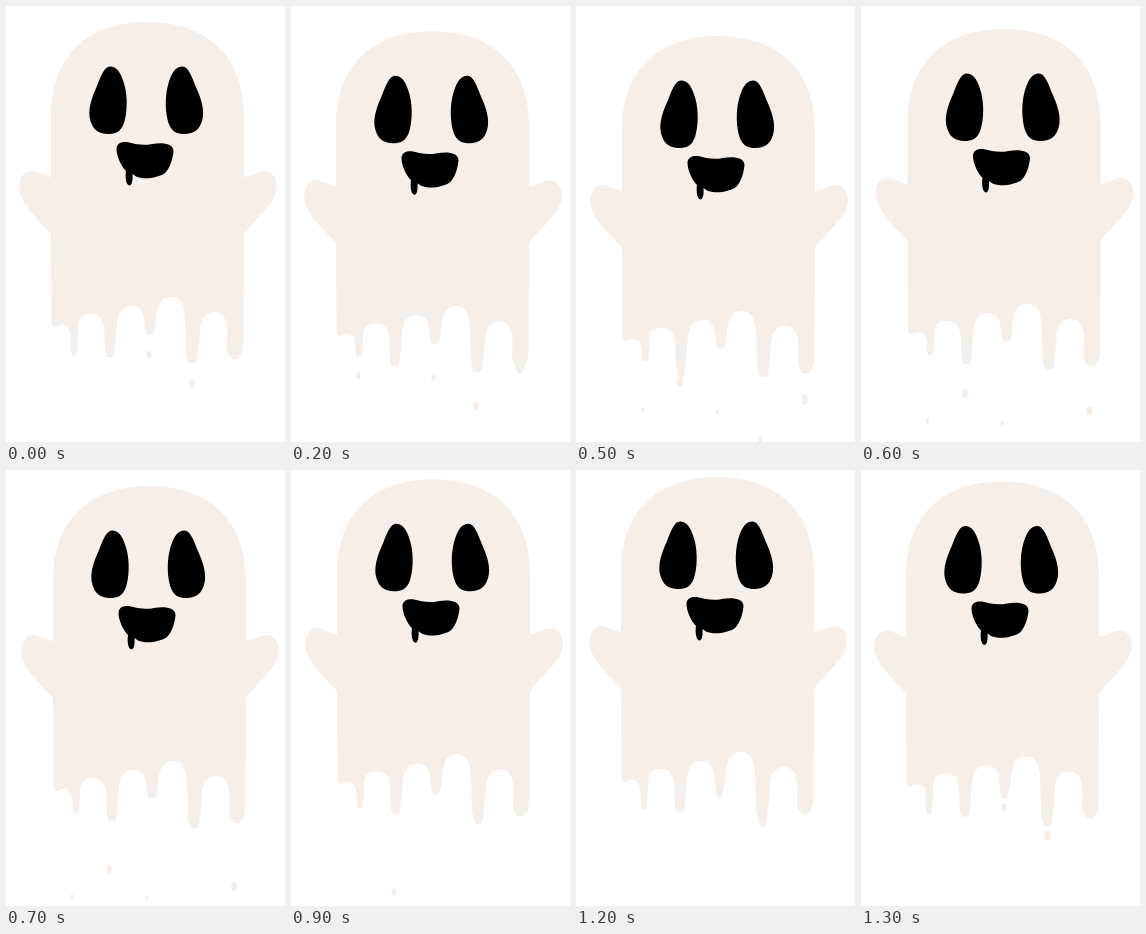
An HTML page for the animation above (1400 ms loop, 279x436 px).

```html
<!DOCTYPE html>
<html lang="en">
<head>
<meta charset="utf-8">
<title>Melting ghost</title>
<style>
  html, body { margin: 0; width: 100%; height: 100%; overflow: hidden; background: #fff; }
  svg { display: block; width: 100%; height: 100%; }
</style>
</head>
<body>
<svg viewBox="0 0 279 436" fill="#f6efe9">
  <g id="ghost">
    <path d="M45 171 L45 110 C45 50 82 16 141 16 C201 16 238 50 238 110 L238 171
      C246 170 252 165 260 165 C267 166 271 173 271 181 C270 197 251 211 238 228
      L237.500 335 C237.500 346 235 352 229 352 C223 352 221 347 221 341
      L221.500 325 C221 312 216 306 208 306 C199 306 194 314 194 325
      C193 335 193 357 186.500 357 C180 357 180 349 180 341
      L179 312 C178 298 174 291 165 291 C154 291 151 301 150 313
      C149 323 149 329 144 329 C139 329 139 321 138 313
      C137 304 132 300 126 300 C116 300 112 306 111 318
      C109 332 111 351 104 351 C98 351 99 342 98.500 333
      C99 319 97 308 85 308 C75 308 72 313 72 323
      C72 332 72 341 68 341 C64 341 65 333 64 327
      C63 321 60 319 55 319 C52 319 51 321 48 321.500 L45.500 318
      L45 228 C33 215 20 203 15 190 C10 177 16 165 25 165 C32 165 38 170 45 171 Z"/>
    <path id="buds"/>
    <g fill="#000">
      <path id="eye" d="M104 60.500 C112 60 116 70 118.500 79 C122 92 121 108 118 117
        C115 126 109 128 102 128 C92 128 87 123 84.500 115 C81 104 86 91 91 80
        C95 70 98 61 104 60.500 Z"/>
      <use href="#eye" transform="matrix(-1 0 0 1 280.500 0)"/>
      <path d="M110.500 143 C110.500 137 116 135.500 121 136 C129 138 137 140 146 138
        C156 136.500 167.500 137 167.500 145.500 C166.500 154 164 162 159 167
        C152 172 138 174 130 170.500 L126.500 168 C127 174 126 179.500 123.500 179.500
        C120 179.500 119 171 120 165 C115 160 110.500 150 110.500 143 Z"/>
    </g>
  </g>
  <path id="drops"/>
</svg>
<script>
const FRAMES = 14, STEP = 100;
const REACH = 10;   // how far a drip stretches before its drop lets go
const SPEED = 11.4; // fall per step

// Turning points of the bobbing: step, height
const bob = [[0, 0], [4, 18.5], [5, 14], [7, 0], [11, -13.5], [14, 0]];

// Tip and half width, step at which the drop lets go, steps of stretching before it
const drips = [
  { x: 68, y: 341, w: 3.5, release: .6, grow: 10 },
  { x: 104, y: 351, w: 4.5, release: 4.9, grow: 2 },
  { x: 143.5, y: 328.5, w: 4, release: 12.5, grow: 5 },
  { x: 186.5, y: 356.5, w: 5, release: 12.5, grow: 7 },
  { x: 229, y: 353, w: 5, release: 3.9, grow: 4 },
];

const $ = id => document.getElementById(id);
const age = (drip, f) => (f - drip.release + FRAMES) % FRAMES;

function height(f) {
  const i = bob.findIndex(([step]) => step > f);
  const [f0, y0] = bob[i - 1], [f1, y1] = bob[i];
  return y0 + (y1 - y0) * (f - f0) / (f1 - f0);
}

function bud(drip, f) {
  const { x, y, w, grow } = drip, a = age(drip, f);
  const len = REACH * Math.max(0, 1 - a, 1 - (FRAMES - a) / grow);
  const top = y - 6, end = y + len, mid = y + len * .2;
  return `M${x - w} ${top}C${x - w} ${mid} ${x - 3} ${end} ${x} ${end}` +
    `C${x + 3} ${end} ${x + w} ${mid} ${x + w} ${top}Z`;
}

function drop(drip, f) {
  const a = age(drip, f);
  const rx = Math.max(1.7, drip.w * .7 - a * .2), ry = rx * 1.6;
  const x = drip.x - a * .3;
  const y = drip.y + REACH + height(drip.release) + a * SPEED;
  return `M${x} ${y - ry}a${rx} ${ry} 0 1 1 0 ${2 * ry}a${rx} ${ry} 0 1 1 0 ${-2 * ry}Z`;
}

function draw(time) {
  const f = Math.floor(time / STEP) % FRAMES;
  const drift = Math.max(0, 2 - Math.abs(f - 7) / 2);
  $("ghost").setAttribute("transform", `translate(${drift} ${height(f)})`);
  $("buds").setAttribute("d", drips.map(d => bud(d, f)).join(""));
  $("drops").setAttribute("d", drips.map(d => drop(d, f)).join(""));
}

const start = performance.now();
function tick() {
  draw(performance.now() - start);
  requestAnimationFrame(tick);
}
tick();
</script>
</body>
</html>
```
